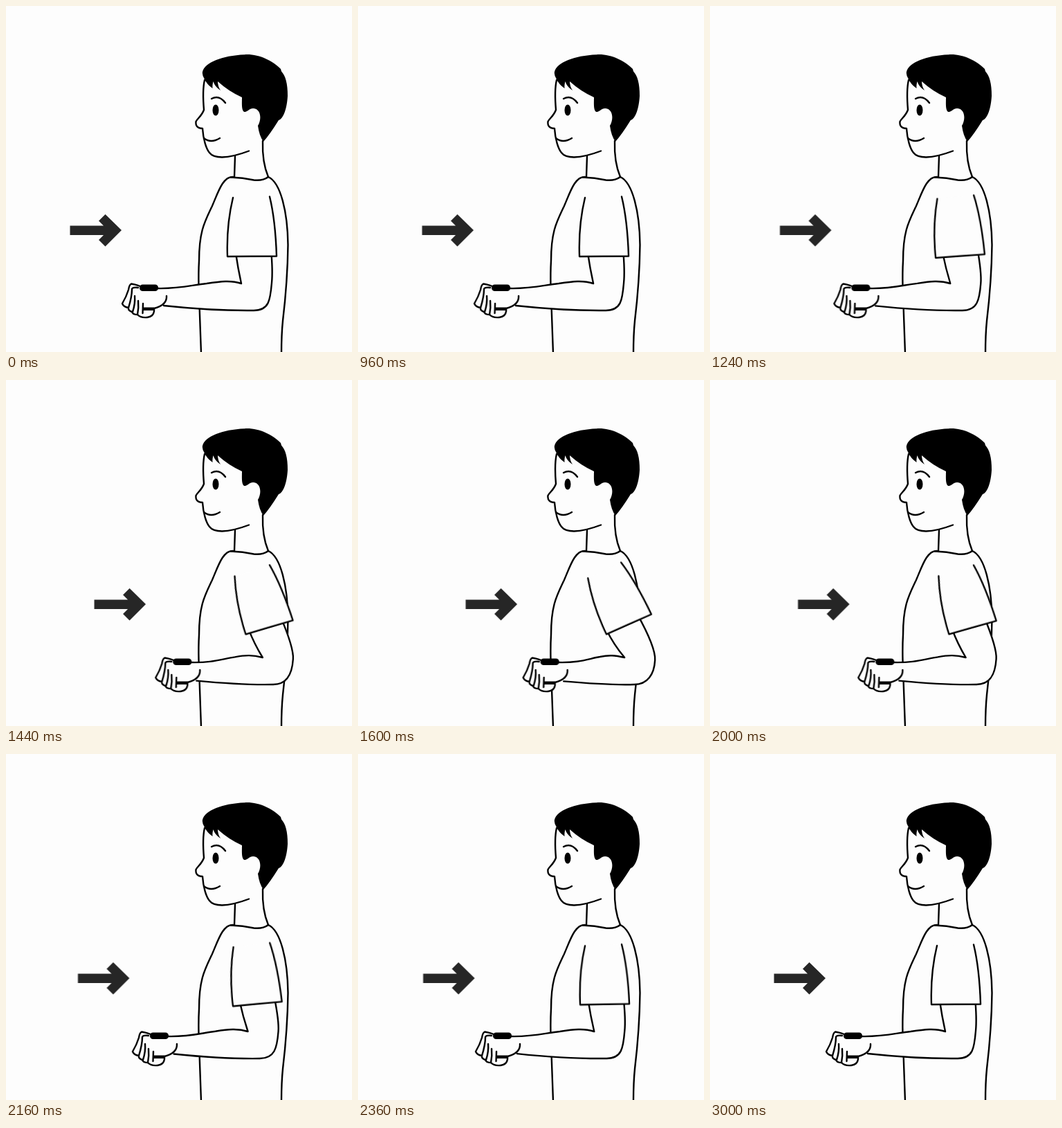
Write an HTML page without scripts that moves like this. It is 500x500 px and loops after 4000 ms.

```html
<!DOCTYPE html>
<html lang="en">
<head>
<meta charset="utf-8">
<title>Elbow pull</title>
<style>
  html, body { margin: 0; width: 100%; height: 100%; overflow: hidden; background: #fdfdfd; }
  svg { display: block; width: 100vw; height: 100vh; }

  .line { fill: none; stroke: #000; stroke-width: 2.4; stroke-linecap: round; stroke-linejoin: round; }
  .skin { fill: #fdfdfd; }
  .arrow { fill: #262626; }

  .arrow, .hand, .sleeve, .arm { animation: 4s infinite both; }
  .arrow { animation-name: push; }
  .hand { animation-name: slide; }
  .arm { animation-name: bend; }
  .sleeve { animation-name: swing; transform-origin: 352.5px 271.5px; }

  /* rest until 920 ms, furthest at 1720 ms, back at 2520 ms */
  @keyframes push {
    0%, 63%, 100% { transform: none; }
    23% { transform: none; animation-timing-function: cubic-bezier(.8, 0, .58, 1); }
    43% { transform: translateX(67px); animation-timing-function: cubic-bezier(.42, 0, .2, 1); }
  }
  @keyframes slide {
    0%, 63%, 100% { transform: none; }
    23% { transform: none; animation-timing-function: cubic-bezier(.75, 0, .5, 1); }
    43% { transform: translateX(73.5px); animation-timing-function: cubic-bezier(.49, 0, .24, 1); }
  }
  @keyframes swing {
    0%, 63%, 100% { transform: rotate(0deg); }
    23% { transform: rotate(0deg); animation-timing-function: cubic-bezier(.75, 0, .5, 1); }
    43% { transform: rotate(-24.6deg); animation-timing-function: cubic-bezier(.49, 0, .24, 1); }
  }
  @keyframes bend {
    0%, 63%, 100% {
      d: path("M218 408C250 409 270 403 290 401C310 398 325 396 340 401Q335 378 332 357L383 352C385 375 385 390 384 400C382 425 380 440 358 440C315 440.5 275 438 228 433");
    }
    23% {
      d: path("M218 408C250 409 270 403 290 401C310 398 325 396 340 401Q335 378 332 357L383 352C385 375 385 390 384 400C382 425 380 440 358 440C315 440.5 275 438 228 433");
      animation-timing-function: cubic-bezier(.75, 0, .5, 1);
    }
    43% {
      d: path("M291 408C323 409 335 403 352 400C365 397 373 398 387 401Q371 383 360 361L404 337C420 365 432 390 431 405C430 425 420 440 401 440C370 441 340 439 300 435.5");
      animation-timing-function: cubic-bezier(.49, 0, .24, 1);
    }
  }
</style>
</head>
<body>
<svg viewBox="0 0 500 500">
  <path class="arrow" d="M92.5 317.5H141L134 310.5L143.5 301L167 324L143.5 347.5L134 338L141 331H92.5Z"/>

  <g class="line">
    <!-- face -->
    <path d="M287 107C284 120 285 138 286 150C283 159 276 163 274.5 167C273.5 174 278 177 284 177C285 192 289 206 294 212C300 220 318 222 351 209.5"/>
    <path d="M286 191Q296 199 309 191M297 134Q308 128 317 140"/>
    <!-- neck and torso -->
    <path d="M331 217L330 247M371 195Q370 226 379 247"/>
    <path d="M325 247.5Q342 248 358 251.5Q371 253 379 247"/>
    <path d="M328 247C313 246 306 271 297.5 290C287 312 279 326 279 368Q278 385 278.5 405Q280 450 282 502"/>
    <path d="M379 247C397 255 407 298 407.5 345C407 390 403 430 400 455Q398 475 398 502"/>
  </g>
  <ellipse cx="303" cy="150.5" rx="4.5" ry="8"/>
  <path d="M284 95C287 82 312 71.5 345 70.2C365 69 385 79 397 91L398 94.5C404 101 407 112 407 130C406 148 401 163 394 165Q381 186 372 196Q366 188 364 173C370 163 368 149 358 148C352 147 350 153 344 153C340 150 341 140 341 132Q322 123.5 306 109Q306 116 310 122Q302 117 299.5 109Q298 114 298.5 119Q290 113 287 106Q283 100 284 95Z"/>

  <path class="line skin arm" d="M218 408C250 409 270 403 290 401C310 398 325 396 340 401Q335 378 332 357L383 352C385 375 385 390 384 400C382 425 380 440 358 440C315 440.5 275 438 228 433"/>

  <g class="hand">
    <path class="line skin" d="M194 405Q186 402 181 401.5Q178 403 177 410Q174 420 168 430Q170 435 177 436Q176 440 182 442Q183 446 190 446Q195 451 204 450Q213 449 214 441L214 437Q233 432 232 419"/>
    <path class="line" d="M191 407Q183 406 182 409Q182 420 177 436M186 419Q187 430 183 442M191 426Q192 436 190 446M198 430L197.5 444"/>
    <path d="M198 435.5H214V440H198Z"/>
    <rect x="193" y="402.5" width="27" height="9.5" rx="4.5"/>
  </g>

  <path class="line skin sleeve" d="M328 277C320 310 319 335 320 362L391 361.5C390 330 387 300 381 275.5"/>
</svg>
</body>
</html>
```
